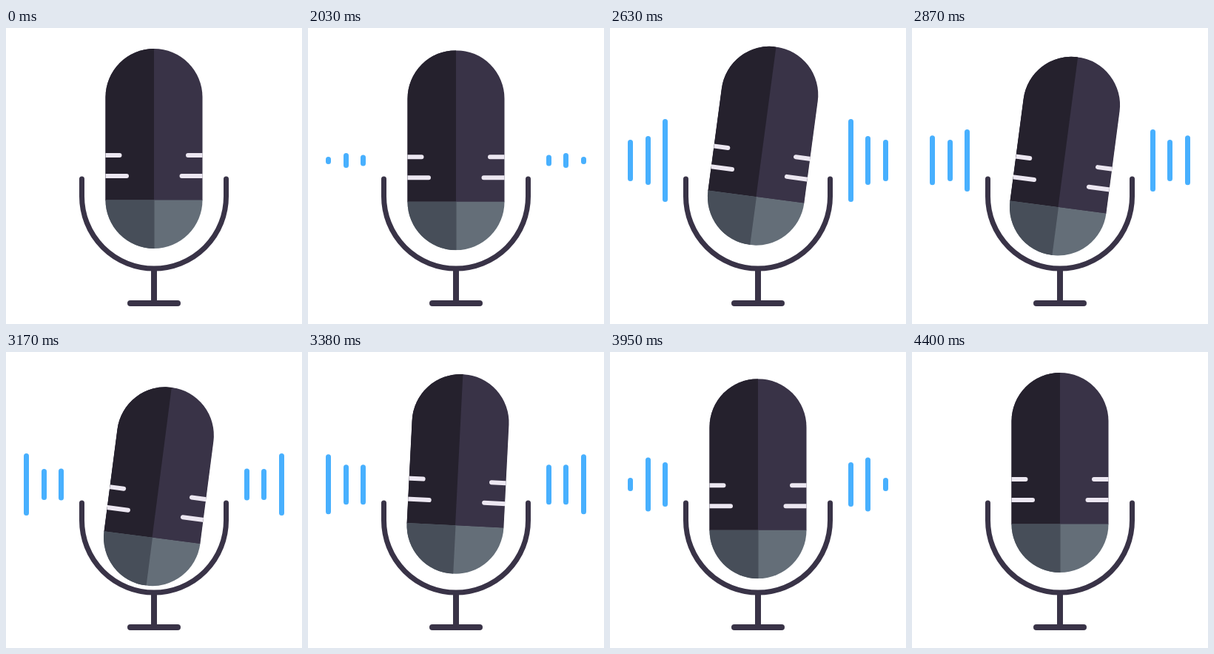
Animation, 400 px wide and 400 px high, one loop 4430 ms. Source, as an HTML page:

```html
<!DOCTYPE html>
<html lang="en">
<head>
<meta charset="utf-8">
<title>Microphone</title>
<style>
  html, body { margin: 0; width: 100%; height: 100%; overflow: hidden; background: #fff; }
  .stage { position: relative; width: 400px; height: 400px; overflow: hidden; }
  svg { position: absolute; inset: 0; }

  .mic {
    transform-box: view-box;
    transform-origin: 200px 213px;
    animation: bounce 4430ms ease-in-out infinite, tilt 4430ms ease-in-out infinite;
  }
  @keyframes bounce {
    0%, 45.8% { translate: 0 0; animation-timing-function: linear; }
    45.82% { translate: 0 2px; animation-timing-function: ease-out; }
    52% { translate: 0 21px; }
    60% { translate: 0 -4.5px; }
    69% { translate: 0 21px; }
    80.9% { translate: 0 -6.7px; }
    87% { translate: 0 8.7px; }
    99.3%, 100% { translate: 0 0; }
  }
  @keyframes tilt {
    0%, 45.82% { rotate: 0deg; }
    58% { rotate: 7.6deg; }
    71.5% { rotate: 7.4deg; }
    81.5% { rotate: -2.2deg; }
    89%, 100% { rotate: 0deg; }
  }

  .bar {
    position: absolute;
    top: 179px;
    width: 7px;
    border-radius: 3.5px;
    background: #48b0fe;
    transform: translateY(-50%);
    animation: 4430ms ease-in-out infinite;
  }
  .outer { animation-name: outer; }
  .middle { animation-name: middle; }
  .inner { animation-name: inner; }
  .left.outer { left: 24px; }
  .left.middle { left: 48px; }
  .left.inner { left: 71px; }
  .right.outer { right: 24px; }
  .right.middle { right: 48px; }
  .right.inner { right: 71px; }

  @keyframes outer {
    0%, 45.8% { height: 0; }
    45.82% { height: 10px; }
    52.5% { height: 64px; }
    59.37% { height: 56px; }
    71.56% { height: 84px; }
    81.72% { height: 78px; }
    89.17% { height: 18px; }
    93% { height: 34px; }
    99.3% { height: 9px; }
    99.32%, 100% { height: 0; }
  }
  @keyframes middle {
    0%, 45.8% { height: 0; }
    45.82% { height: 20px; }
    52.5% { height: 82px; }
    59.37% { height: 66px; }
    71.56% { height: 42px; }
    81.72% { height: 68px; }
    89.17% { height: 73px; }
    99.3% { height: 9px; }
    99.32%, 100% { height: 0; }
  }
  @keyframes inner {
    0%, 45.8% { height: 0; }
    45.82% { height: 15px; }
    52.5% { height: 58px; }
    59.37% { height: 112px; }
    71.56% { height: 43px; }
    81.72% { height: 67px; }
    89.17% { height: 60px; }
    99.3% { height: 9px; }
    99.32%, 100% { height: 0; }
  }
</style>
</head>
<body>
<div class="stage">
  <svg width="400" height="400" viewBox="0 0 400 400">
    <defs>
      <clipPath id="capsule"><rect x="134.5" y="28" width="131" height="270" rx="65.5"/></clipPath>
    </defs>
    <g fill="none" stroke="#393347" stroke-linecap="round">
      <path d="M102.5 204V227.5A97.5 97.5 0 0 0 297.5 227.5V204" stroke-width="7"/>
      <path d="M200 326V372M168 372H232" stroke-width="8"/>
    </g>
    <g class="mic">
      <g clip-path="url(#capsule)">
        <path d="M134 28H266V233H134Z" fill="#393347"/>
        <path d="M134 28H200V233H134Z" fill="#25212d"/>
        <path d="M134 232.5H266V298H134Z" fill="#646e78"/>
        <path d="M134 232.5H200.5V298H134Z" fill="#474e59"/>
        <path d="M128 172H153.5M128 200H163M272 172H246M272 200H237.5"
              stroke="#ece7f1" stroke-width="6" stroke-linecap="round"/>
      </g>
    </g>
  </svg>
  <div class="bar left outer"></div>
  <div class="bar left middle"></div>
  <div class="bar left inner"></div>
  <div class="bar right inner"></div>
  <div class="bar right middle"></div>
  <div class="bar right outer"></div>
</div>
</body>
</html>
```
